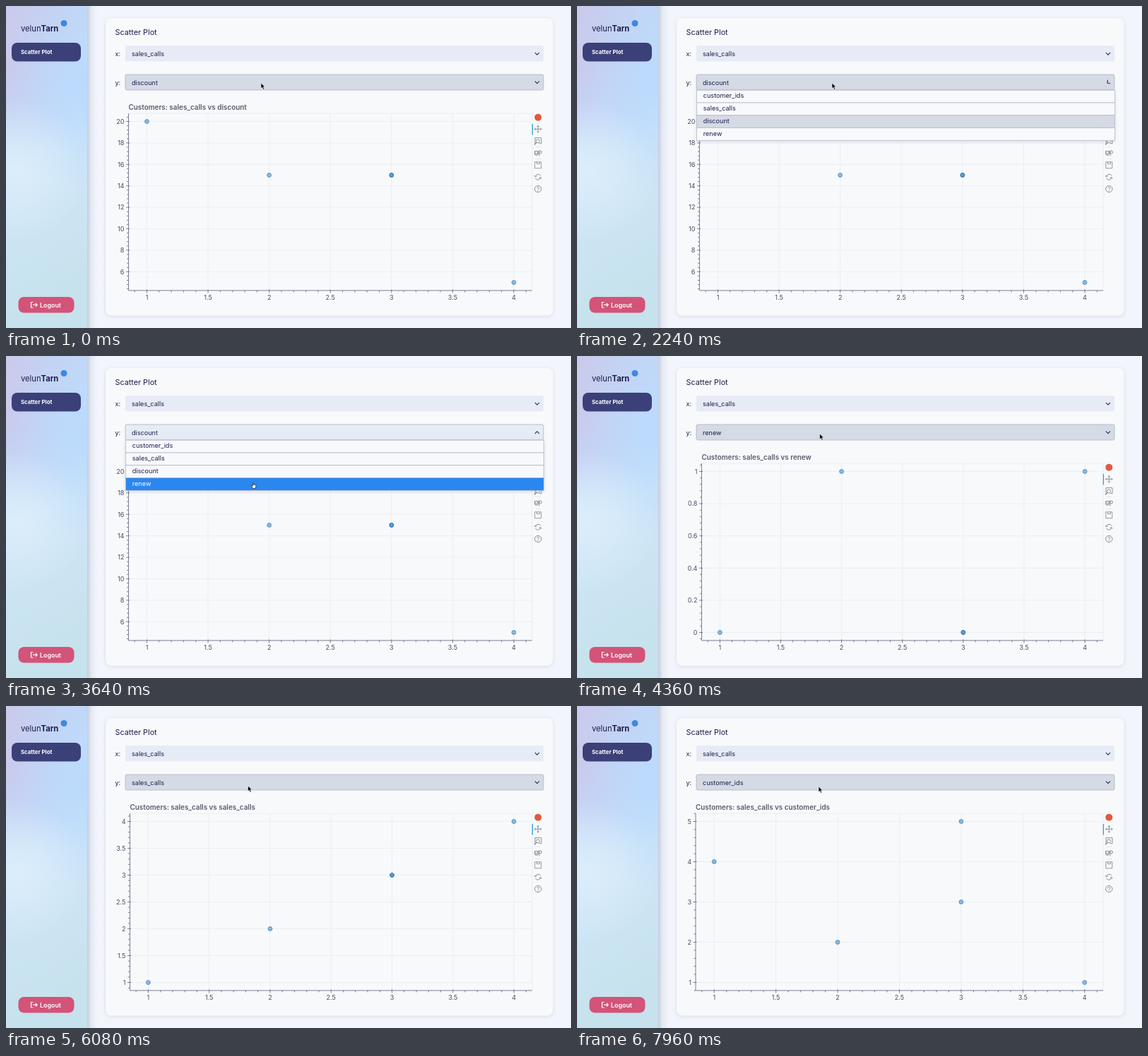
An HTML page that plays this animation: 800 by 456 pixels, repeating every 8 s.

```html
<!DOCTYPE html>
<html lang="en">
<head>
<meta charset="utf-8">
<title>Scatter Plot</title>
<style>
  html, body { margin: 0; width: 100%; height: 100%; overflow: hidden; background: #f2f5fb; }
  svg { display: block; width: 800px; height: 456px; }
  text { font: 9.1px Inter, "Open Sans", sans-serif; fill: #1c1d4b; }
  .heading { font-size: 10.8px; }
  .brand { font-size: 11.2px; }
  .brand tspan { font-weight: 700; }
  .nav { font-size: 7.8px; font-weight: 700; fill: #fff; }
  .logout { font-size: 8.9px; font-weight: 600; fill: #fff; }
  .plot text { fill: #4b4d68; }
  .plot .title { font-size: 9.9px; font-weight: 600; fill: #5a5b70; }
  .grid { stroke: #e8ecf1; stroke-width: .8; }
  .axis { stroke: #5d607c; stroke-width: .8; }
  .dot { fill: #2b7fc6; fill-opacity: .5; stroke: #2c71ab; stroke-opacity: .75; stroke-width: .9; }
  .line { fill: none; stroke: #25274f; stroke-width: 1.1; stroke-linecap: round; stroke-linejoin: round; }
  .tools { fill: none; stroke: #8c9096; stroke-width: 1; }
</style>
</head>
<body>
<svg viewBox="0 0 800 456">
  <defs>
    <linearGradient id="side" x1="0" y1="0" x2=".15" y2="1">
      <stop offset="0" stop-color="#c6cdee"/>
      <stop offset=".28" stop-color="#c3dcf9"/>
      <stop offset=".55" stop-color="#cfe6f8"/>
      <stop offset="1" stop-color="#c6e2ec"/>
    </linearGradient>
    <radialGradient id="lilac" gradientUnits="userSpaceOnUse" cx="0" cy="85" r="120">
      <stop offset="0" stop-color="#d0c4e6"/>
      <stop offset="1" stop-color="#d0c4e6" stop-opacity="0"/>
    </radialGradient>
    <radialGradient id="sky" gradientUnits="userSpaceOnUse" cx="115" cy="110" r="150">
      <stop offset="0" stop-color="#badafd"/>
      <stop offset="1" stop-color="#badafd" stop-opacity="0"/>
    </radialGradient>
    <radialGradient id="pale" gradientUnits="userSpaceOnUse" cx="15" cy="235" r="100">
      <stop offset="0" stop-color="#dcedfa"/>
      <stop offset="1" stop-color="#dcedfa" stop-opacity="0"/>
    </radialGradient>
    <linearGradient id="edge">
      <stop offset="0" stop-color="#8795b4" stop-opacity=".42"/>
      <stop offset=".4" stop-color="#8795b4" stop-opacity=".12"/>
      <stop offset="1" stop-color="#8795b4" stop-opacity="0"/>
    </linearGradient>
    <filter id="soft" x="-5%" y="-10%" width="110%" height="125%">
      <feDropShadow dx="0" dy="1" stdDeviation="2.5" flood-color="#8890a8" flood-opacity=".28"/>
    </filter>
    <path id="chevron" class="line" d="M-2.8-1.4 0 1.4 2.8-1.4"/>
  </defs>

  <rect width="800" height="456" fill="#f2f5fb"/>
  <rect x="115" width="15" height="456" fill="url(#edge)"/>
  <g id="sidebar"></g>
  <circle cx="82" cy="24.5" r="4.5" fill="#3f87e2"/>
  <text class="brand" x="21" y="36">velun<tspan>Tarn</tspan></text>
  <rect x="8" y="52" width="98" height="26.5" rx="8" fill="#3b4079"/>
  <text class="nav" x="21" y="68">Scatter Plot</text>
  <rect x="17.5" y="412" width="79" height="22.5" rx="8" fill="#d35379"/>
  <path d="M38.5 419.5h-3v7.5h3M38 423.2h6M41.8 420.8l2.4 2.4-2.4 2.4" fill="none" stroke="#fff" stroke-width="1.2"/>
  <text class="logout" x="48" y="426.5">Logout</text>

  <rect x="141" y="17" width="633.5" height="421.5" rx="8" fill="#f7f9fb" filter="url(#soft)"/>
  <text class="heading" x="154.5" y="41">Scatter Plot</text>
  <text x="154.5" y="70.7">x:</text>
  <rect x="169" y="56" width="592" height="22.5" rx="2" fill="#e7ebf6"/>
  <text x="178" y="70.7">sales_calls</text>
  <use href="#chevron" x="752" y="67.8"/>
  <text x="154.5" y="111.7">y:</text>
  <rect id="box" x="169" y="97" width="592" height="22" rx="2" stroke-width=".9"/>
  <text id="value" x="178" y="111.5"></text>
  <use id="arrow" href="#chevron"/>

  <g id="plots"></g>

  <circle cx="753.3" cy="157.7" r="5" fill="#e25a3c"/>
  <path d="M745.4 167v15.5" stroke="#26a0da" stroke-width="1.3"/>
  <g class="tools">
    <path d="M748.5 174.3h9.6M753.3 169.5v9.6M750 172.8l-1.6 1.5 1.6 1.5M756.6 172.8l1.6 1.5-1.6 1.5M751.8 171l1.5-1.6 1.5 1.6M751.8 177.6l1.5 1.6 1.5-1.6"/>
    <path d="M749 193.5v-6.800h9v8h-3M750.500 194.700l-2.200 2"/>
    <circle cx="753" cy="191.500" r="2.500"/><path d="M751.200 193.300l-3 2.600" stroke-width="1.500"/>
    <circle cx="751" cy="207.500" r="2.200"/><path d="M748.800 205v5.500q2.200 2 4.400 0V205M755 212.500v-8"/><circle cx="756.500" cy="207" r="2"/>
    <path d="M748.800 220.800h9v9h-9zM751.500 221v2.600h4V221" stroke-width=".9"/>
    <path d="M749.500 241.500a4 4 0 0 1 7.500-1M757 243a4 4 0 0 1-7.500 1M748 240l1.500 2 2-1.300M758.500 244.500l-1.500-2-2 1.300"/>
    <circle cx="753.300" cy="259" r="4.700"/>
    <path d="M751.700 257.700q.2-1.500 1.700-1.500 1.600.1 1.500 1.500-.2.900-1.500 1.600v.9M753.400 261.100v1"/>
    <path d="M749.500 199.500h7.500M749.500 216.500h7.500" stroke="#dfe3e9" stroke-width=".7"/>
  </g>

  <g id="menu" filter="url(#soft)"></g>

  <path id="pointer" d="M0 0v8l1.900-1.700 1.300 3 1.500-.7-1.300-2.900h2.500z" fill="#080808" stroke="#fff" stroke-width=".6"/>
  <path id="hand" d="M-.8 1q0-1 .8-1t.8 1v2.600l.4-.4q.9-.3 1.100.5.800-.5 1.200.4.900-.3 1.100.7v2q0 2.800-2.200 2.800H.2Q-.8 9.600-1.500 8.300L-3.500 5.600q0-1 1-.8L-.8 6z" fill="#fff" stroke="#222" stroke-width=".9"/>
</svg>

<script>
const LOOP = 8000, PRESS = 120, REDRAW = 80, TURN = 200;
const RIGHT = 745, TOP = 152.100, BOTTOM = 402.900;
const SHADE = '#d5dae5', PLAIN = '#e7ebf6';
const options = ['customer_ids', 'sales_calls', 'discount', 'renew'];
const customers = [[1, 4, 5, 1], [2, 2, 15, 1], [3, 3, 15, 0], [4, 1, 20, 0], [5, 3, 15, 0]];
const axes = [
  { left: 168, step: 1 }, { left: 175.500, step: .5 },
  { left: 173.500, step: 2 }, { left: 176.500, step: .2 }
];
// Each visit to the menu: when it opens, when it closes, what is picked.
const visits = [
  { open: 2180, close: 3720, pick: 3 },
  { open: 4680, close: 5480, pick: 1 },
  { open: 6560, close: 7320, pick: 0 }
];
// Cursor stops: time, x, y of the tip.
const path = [
  [0, 361, 109], [2700, 361, 109], [3340, 350, 179.300], [3760, 350, 179.300],
  [4200, 343.500, 110], [4760, 343.500, 110], [5120, 344, 141.500], [5560, 344, 141.500],
  [5960, 342.500, 113], [6640, 342.500, 113], [6840, 342.500, 119], [7040, 342, 127],
  [7380, 342, 127], [7640, 342, 114], [LOOP, 342, 114]
];

const $ = id => document.getElementById(id);
function add(parent, tag, attrs, text) {
  const node = document.createElementNS('http://www.w3.org/2000/svg', tag);
  for (const key in attrs) node.setAttribute(key, attrs[key]);
  if (text !== undefined) node.textContent = text;
  return parent.appendChild(node);
}
const set = (node, attrs) => { for (const key in attrs) node.setAttribute(key, attrs[key]); };
const show = (node, on) => node.style.display = on ? '' : 'none';

for (const fill of ['side', 'lilac', 'sky', 'pale'])
  add($('sidebar'), 'rect', { width: 115, height: 456, fill: `url(#${fill})` });

function ticks(lo, hi, step) {
  const list = [];
  for (let i = Math.ceil(lo / step - 1e-6); i * step <= hi + 1e-6; i++) list.push(i);
  return list;
}

function buildPlot({ left, step }, column) {
  const g = add($('plots'), 'g', { class: 'plot' });
  const values = customers.map(row => row[column]);
  const min = Math.min(...values), max = Math.max(...values), pad = (max - min) * .05;
  const lo = min - pad, hi = max + pad;
  const px = v => left + (v - .85) / 3.3 * (RIGHT - left);
  const py = v => BOTTOM - (v - lo) / (hi - lo) * (BOTTOM - TOP);
  const line = (cls, d) => add(g, 'path', { class: cls, d, fill: 'none' });
  const label = v => String(+v.toFixed(2));

  add(g, 'text', { class: 'title', x: left, y: 146.500 }, `Customers: sales_calls vs ${options[column]}`);
  line('grid', `M${left} ${TOP}H${RIGHT}V${BOTTOM}`);
  for (const i of ticks(.85, 4.15, .1)) {
    const x = px(i / 10), major = i % 5 === 0;
    if (major) {
      line('grid', `M${x} ${TOP}V${BOTTOM}`);
      add(g, 'text', { x, y: 415.500, 'text-anchor': 'middle' }, label(i / 10));
    }
    line('axis', `M${x} ${BOTTOM - (major ? 1.500 : 0)}v${major ? 5 : 2.500}`);
  }
  for (const i of ticks(lo, hi, step / 5)) {
    const v = i * step / 5, y = py(v), major = i % 5 === 0;
    if (major) {
      line('grid', `M${left} ${y}H${RIGHT}`);
      add(g, 'text', { x: left - 6, y: y + 3.300, 'text-anchor': 'end' }, label(v));
    }
    line('axis', `M${left + (major ? 1.500 : 0)} ${y}h${major ? -5 : -2.500}`);
  }
  line('axis', `M${left} ${TOP}V${BOTTOM}H${RIGHT}`);
  for (const row of customers)
    add(g, 'circle', { class: 'dot', cx: px(row[1]), cy: py(row[column]), r: 2.900 });
  return g;
}
const plots = axes.map(buildPlot);

const ROW = 17.800, MENU = 119.200;
const rows = options.map((name, i) => {
  const y = MENU + i * ROW;
  const rect = add($('menu'), 'rect', {
    x: 169.500, y, width: 592, height: ROW, stroke: '#b5bac6', 'stroke-width': .8
  });
  return { rect, text: add($('menu'), 'text', { x: 178.800, y: y + 11.200 }, name) };
});

function cursorAt(t) {
  const i = path.findIndex(stop => stop[0] > t);
  const [t0, x0, y0] = path[i - 1], [t1, x1, y1] = path[i];
  const u = (t - t0) / (t1 - t0), k = u * u * (3 - 2 * u);
  return [x0 + (x1 - x0) * k, y0 + (y1 - y0) * k];
}

function chosen(t) {
  return visits.reduce((pick, v) => t >= v.close ? v.pick : pick, 2);
}

function chevronAngle(t) {
  let angle = 0;
  const ramp = from => Math.min(1, Math.max(0, (t - from) / TURN));
  for (const v of visits) angle += 180 * (ramp(v.open) - ramp(v.close));
  return angle;
}

function draw(t) {
  const [x, y] = cursorAt(t);
  const visit = visits.find(v => t >= v.open && t < v.close);
  const value = chosen(t), plot = chosen(t - REDRAW);
  const hover = y >= 97 && y < MENU;
  const over = visit && y >= MENU ? Math.floor((y - MENU) / ROW) : -1;
  const pressed = visit && t >= visit.close - PRESS;

  set($('box'), { fill: hover ? SHADE : PLAIN, stroke: hover || visit ? '#b3b9c8' : 'none' });
  $('value').textContent = options[value];
  set($('arrow'), { transform: `translate(752 108.200) rotate(${chevronAngle(t)})` });
  plots.forEach((g, i) => show(g, i === plot));

  show($('menu'), visit);
  const marked = over < 0 ? value : over;
  rows.forEach(({ rect, text }, i) => {
    const active = pressed && i === over;
    set(rect, { fill: active ? '#2c87f0' : i === marked ? SHADE : '#f8f9fc' });
    text.style.fill = active ? '#fff' : '';
  });

  show($('hand'), over >= 0);
  show($('pointer'), over < 0);
  set($('pointer'), { transform: `translate(${x} ${y})` });
  set($('hand'), { transform: `translate(${x} ${y}) scale(${pressed ? .85 : 1})` });
}

const start = performance.now();
function tick() {
  draw((performance.now() - start) % LOOP);
  requestAnimationFrame(tick);
}
tick();
</script>
</body>
</html>
```
